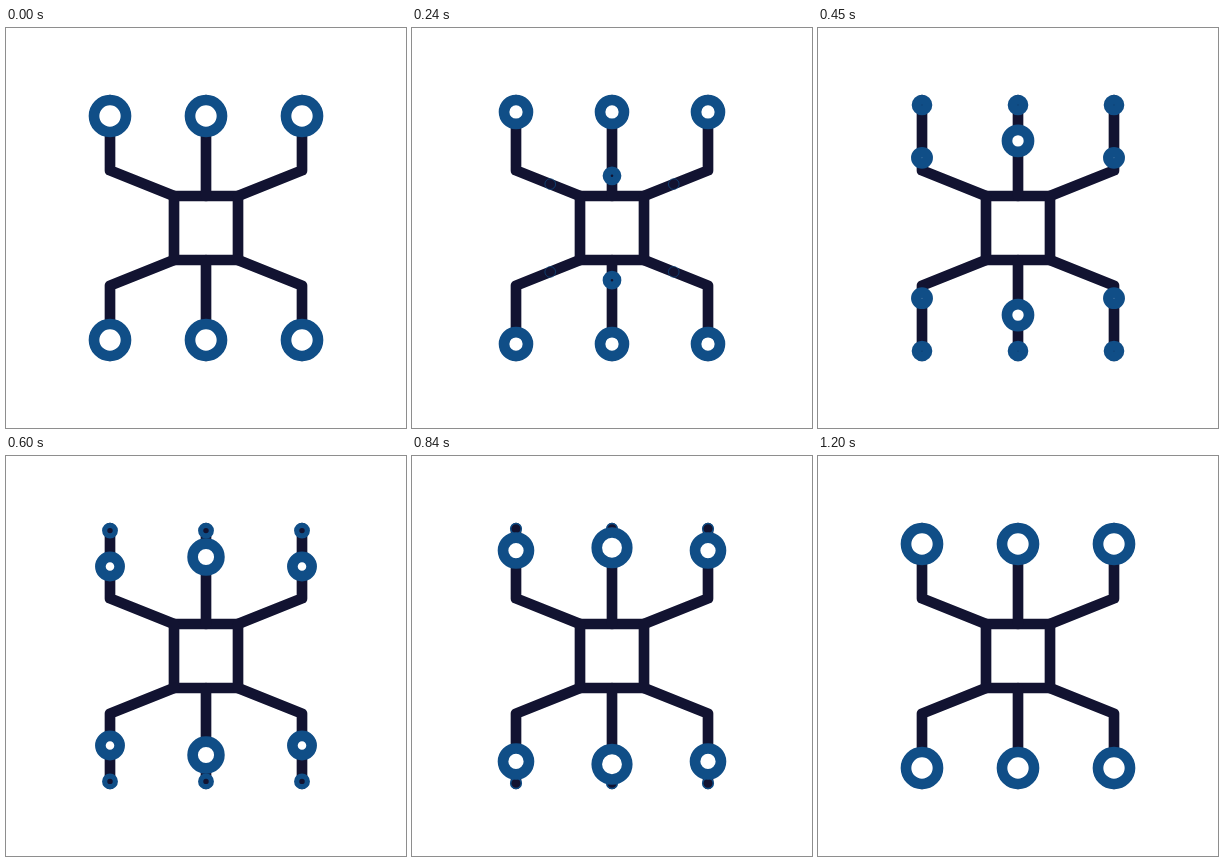
An HTML page without scripts that plays this animation: 400x400 px, repeating every 3230 ms.

```html
<!DOCTYPE html>
<html lang="en">
<head>
<meta charset="utf-8">
<title>Chip nodes</title>
<style>
  /* progress of the centre nodes, the side nodes, and the side nodes' size */
  @property --mid { syntax: "<number>"; inherits: true; initial-value: 0; }
  @property --side { syntax: "<number>"; inherits: true; initial-value: 0; }
  @property --grow { syntax: "<number>"; inherits: true; initial-value: 0; }

  html, body { margin: 0; width: 100%; height: 100%; overflow: hidden; background: #fff; }

  svg {
    display: block;
    width: 100%;
    height: 100%;
    animation: 3230ms infinite;
    animation-name: mid, side, grow;
    animation-timing-function:
      cubic-bezier(.325, 0, .097, 1),
      cubic-bezier(.288, 0, .16, 1),
      linear(0, 0 17%, .02 20%, .16 28%, .35 37.5%, .49 44%, .6 50%, .67 55%,
             .72 60%, .81 70%, .88 80%, .945 90%, 1);
  }
  @keyframes mid { 37.152%, to { --mid: 1; } }
  @keyframes side { 37.152%, to { --side: 1; } }
  @keyframes grow { 37.152%, to { --grow: 1; } }

  .wire {
    fill: none;
    stroke: #121331;
    stroke-width: 10.667px;
    stroke-linecap: round;
    stroke-linejoin: round;
  }

  /* below half the line weight a ring thins out instead of shrinking */
  .ring {
    r: calc(max(var(--r), 5.333) * 1px);
    stroke: #104e87;
    stroke-width: calc(min(2 * var(--r), 10.667) * 1px);
    fill: rgb(255 255 255 / clamp(0, (var(--r) - 5.333) * 99, 1));
  }
  .old {
    --r: calc(16 * (1 - var(--mid)));
    cy: calc((72 + var(--r)) * 1px);
  }
  .mid {
    --r: calc(16 * var(--mid));
    cx: 200px;
    cy: calc((168 - 80 * var(--mid)) * 1px);
  }
  .side {
    --r: calc(16 * var(--grow));
    --slant: min(1, var(--side) / .559);
    --rise: max(0, (var(--side) - .559) / .441);
    cx: calc((168 - 64 * var(--slant)) * 1px);
    cy: calc((168 - 25.6 * var(--slant) - 54.4 * var(--rise)) * 1px);
  }
</style>
</head>
<body>
<svg viewBox="0 0 400 400">
  <defs>
    <g id="arm">
      <path class="wire" d="M168 168L104 142.4V72"/>
      <circle class="ring old" cx="104"/>
      <circle class="ring side"/>
    </g>
    <g id="stem">
      <path class="wire" d="M200 168V72"/>
      <circle class="ring old" cx="200"/>
      <circle class="ring mid"/>
    </g>
    <g id="half">
      <use href="#arm"/>
      <use href="#arm" transform="matrix(-1 0 0 1 400 0)"/>
      <use href="#stem"/>
    </g>
  </defs>
  <path class="wire" d="M168 168H232V232H168Z"/>
  <use href="#half"/>
  <use href="#half" transform="matrix(1 0 0 -1 0 400)"/>
</svg>
</body>
</html>
```
